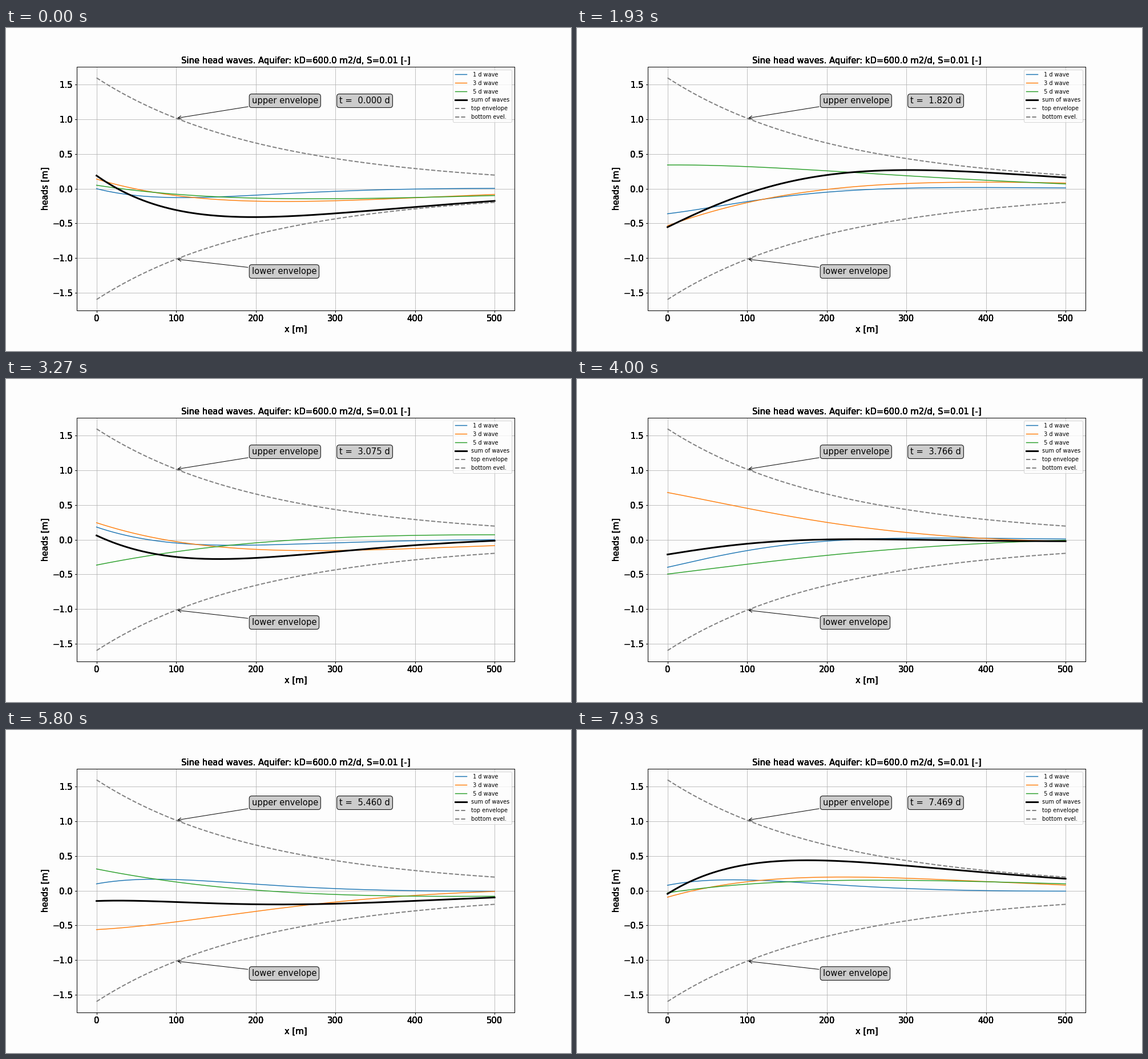
Recreate the animation shown at these times as a matplotlib script. Size 990 by 566 pixels, loop 8 s.

```python
import numpy as np
import matplotlib.pyplot as plt
from matplotlib.animation import FuncAnimation

plt.rcParams.update({
    "font.family": "DejaVu Sans",
    "font.size": 15,
    "axes.titlesize": 15,
    "axes.labelsize": 15,
    "legend.fontsize": 10,
    "axes.facecolor": "#fdfdfd",
    "figure.facecolor": "#fdfdfd",
})

W, H = 990, 566
DPI = W / 14             # a 14 inch wide figure
EPS = 1e-6               # keeps the pixel size from rounding down
LOOP = 8000
STEPS, SUB = 120, 3      # time steps per loop, animation frames per step
DT = 15 / 239            # days per step
LAYERS = 5               # repeated label passes give the heavy text edges

kD, S = 600.0, 0.01
period = np.array([1, 3, 5])[:, None]
amp = np.array([0.4, 0.7, 0.5])[:, None]
phase = np.array([0.0, 0.2, 0.1])[:, None]
omega = 2 * np.pi / period
decay = np.sqrt(omega * S / (2 * kD))
x = np.linspace(0, 500, 501)
damped = amp * np.exp(-decay * x)
envelope = damped.sum(axis=0)


def heads(t):
    return damped * np.sin(omega * t - decay * x + phase)


def add_axes(face):
    a = fig.add_axes([0.125, 0.125, 0.775, 0.755], facecolor=face)
    a.set(xlim=(-25, 525), ylim=(-1.76, 1.76), xlabel="x [m]", ylabel="heads [m]",
          title=f"Sine head waves. Aquifer: kD={kD} m2/d, S={S} [-]")
    return a


def note(text, pos, xy=None):
    box = dict(boxstyle="round", fc="0.8")
    if xy is None:
        return ax.text(*pos, text, transform=ax.transAxes, bbox=box, zorder=5)
    return ax.annotate(text, xy=xy, xytext=pos, textcoords="axes fraction",
                       bbox=box, arrowprops=dict(arrowstyle="->"), zorder=5)


fig = plt.figure(figsize=((W + EPS) / DPI, (H + EPS) / DPI), dpi=DPI)

# Draw the fixed labels, grid and frame once and keep them as a backdrop.
layers = [add_axes("#fdfdfd")] + [add_axes("none") for _ in range(LAYERS - 1)]
layers[0].grid(color="#b0b0b0", lw=0.8)
fig.canvas.draw()
backdrop = np.array(fig.canvas.buffer_rgba())
for layer in layers:
    layer.remove()
fig.figimage(backdrop, zorder=-1)

ax = add_axes("none")
ax.set_title("")
ax.set_axis_off()

waves = [ax.plot(x, h, lw=1.5, label=f"{p:2d} d wave")[0]
         for p, h in zip(period[:, 0], heads(0))]
total, = ax.plot(x, heads(0).sum(axis=0), "k", lw=3, label="sum of waves")
for sign, name in ((1, "top envelope"), (-1, "bottom evel.")):
    ax.plot(x, sign * envelope, "--", color="gray", lw=2, label=name)
ax.legend(loc="upper right", facecolor="#fdfdfd")

note("upper envelope", (0.4, 0.85), (100, envelope[100]))
note("lower envelope", (0.4, 0.15), (100, -envelope[100]))
clock = note("", (0.6, 0.85))


def update(i):
    step = min((i + 1) // SUB, STEPS - 1)
    t = step * DT
    h = heads(t)
    for line, y in zip(waves, h):
        line.set_ydata(y)
    total.set_ydata(h.sum(axis=0))
    clock.set_text(f"t = {t:6.3f} d")
    return [*waves, total, clock]


anim = FuncAnimation(fig, update, frames=STEPS * SUB, interval=LOOP / (STEPS * SUB),
                     repeat=True, repeat_delay=0, blit=False)
plt.show()
```
